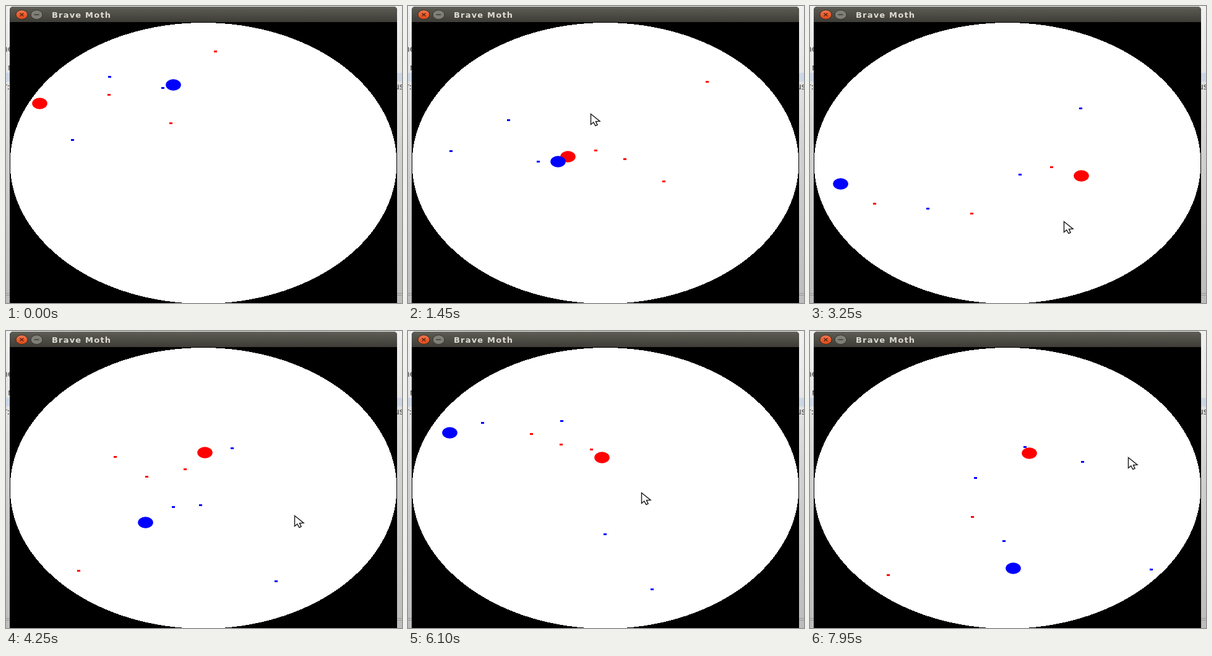
Write an HTML page that moves like this. It is 640 px wide and 480 px high and loops after 8 s.

```html
<!DOCTYPE html>
<html lang="en">
<head>
<meta charset="utf-8">
<title>Brave Moth</title>
<style>
  html, body { margin: 0; width: 100%; height: 100%; overflow: hidden; background: #ddd; }
  svg { display: block; width: 100vw; height: 100vh; }
  text { font-family: "DejaVu Sans", sans-serif; }
  .behind { font-size: 14px; fill: #444; }
  .crisp { shape-rendering: crispEdges; }
</style>
</head>
<body>
<svg viewBox="0 0 640 480">
  <defs>
    <linearGradient id="bar" x2="0" y2="1">
      <stop stop-color="#64635d"/><stop offset=".15" stop-color="#595850"/><stop offset="1" stop-color="#3d3c37"/>
    </linearGradient>
    <linearGradient id="desk" x2="0" y2="1">
      <stop stop-color="#f1f1f1"/><stop offset=".25" stop-color="#e2e2e2"/>
      <stop offset=".5" stop-color="#d0d0d0"/><stop offset="1" stop-color="#bcbcbc"/>
    </linearGradient>
    <linearGradient id="close" x2="0" y2="1">
      <stop stop-color="#f27850"/><stop offset="1" stop-color="#dd4814"/>
    </linearGradient>
  </defs>
  <rect width="640" height="480" fill="url(#desk)"/>
  <path d="M0 108H640V122H0z" fill="#cbd6e4"/>
  <path d="M0 464.500H640M0 467.500H640" stroke="#999"/>
  <g class="behind">
    <text x="-6" y="74">ne</text><text x="3" y="104">r</text>
    <text x="-4" y="135">r:</text><text x="627" y="135">us</text>
  </g>
  <path d="M6 480V7Q6 1 12 1H626Q632 1 632 7V480z" fill="#000"/>
  <path d="M6 26V7Q6 1 12 1H626Q632 1 632 7V26z" fill="url(#bar)"/>
  <ellipse cx="25.500" cy="14" rx="9.500" ry="7.500" fill="url(#close)" stroke="#3a2a22"/>
  <path d="M22.500 11.500L28.500 16.500M28.500 11.500L22.500 16.500" stroke="#56220f" stroke-width="1.500"/>
  <ellipse cx="49.500" cy="14" rx="9.500" ry="7.500" fill="#807e76" stroke="#34332f"/>
  <path d="M45.500 14H53.500" stroke="#3c3b37" stroke-width="1.500"/>
  <text x="74" y="18.500" font-size="13" font-weight="bold" letter-spacing="1.200" fill="#dfdbd2">Brave Moth</text>
  <ellipse class="crisp" cx="319" cy="254" rx="312.500" ry="227" fill="#fff"/>
  <g id="shots" class="crisp"></g>
  <ellipse id="red" cx=".500" cy=".500" rx="12.300" ry="9.200" fill="#f00"/>
  <ellipse id="blue" cx=".500" cy=".500" rx="12.300" ry="9.200" fill="#00f"/>
  <path id="cursor" d="M.500.500V17.500L4.800 13.900L7.900 19.500L11.100 18.100L8.500 12.700L15 12.200z"
    fill="#fff" stroke="#222" stroke-width="1.500"/>
</svg>
<script>
const LOOP = 8000, STEP = 50, SHOT_SPEED = 0.4;

// Key positions, all passed at the same times; speed is in px per ms
const TIMES = [0, 750, 2150, 3250, 5250, 7000, 7950];
const actors = {
  red: { speed: 0.18, keys: [[54, 157], [154, 182], [343, 166], [438, 274], [394, 319], [215, 296], [354, 197]] },
  blue: { speed: 0.2, keys: [[270, 127], [354, 243], [236, 365], [49, 287], [227, 143], [130, 336], [328, 383]] },
  cursor: { speed: 0, keys: [[300, -22], [254, 146], [350, 195], [410, 348], [484, 234], [282, 292], [514, 204]] }
};

const $ = id => document.getElementById(id);

let seed = 11;
function random() {
  seed = (seed * 16807) % 2147483647;
  return seed / 2147483647;
}

function slope(keys, i, axis) {
  const a = Math.max(i - 1, 0), b = Math.min(i + 1, keys.length - 1);
  return (keys[b][axis] - keys[a][axis]) / (TIMES[b] - TIMES[a]);
}

// Smooth curve through the keys; a jet swerves sideways to use up its speed
function at({ speed, keys }, t) {
  if (t <= 0) return keys[0];
  if (t >= TIMES[TIMES.length - 1]) return keys[keys.length - 1];
  const i = TIMES.findIndex(k => k > t) - 1, a = keys[i], b = keys[i + 1];
  const span = TIMES[i + 1] - TIMES[i], u = (t - TIMES[i]) / span, v = 1 - u;
  const dx = b[0] - a[0], dy = b[1] - a[1], chord = Math.hypot(dx, dy);
  const spare = Math.sqrt(Math.max(0, (speed * span) ** 2 - chord ** 2));
  const swerve = 0.45 * spare * Math.sin(Math.PI * u) ** 2 / chord;
  return [-dy, dx].map((side, k) =>
    a[k] * v * v * (1 + 2 * u) + b[k] * u * u * (3 - 2 * u) + side * swerve +
    span * u * v * (slope(keys, i, k) * v - slope(keys, i + 1, k) * u));
}

const inside = ([x, y]) => ((x - 319) / 312) ** 2 + ((y - 254) / 227) ** 2 < 1;

const where = (shot, t) => [
  shot.x + Math.cos(shot.angle) * SHOT_SPEED * (t - shot.start),
  shot.y + Math.sin(shot.angle) * SHOT_SPEED * (t - shot.start)];

// Each jet keeps firing roughly at its rival; shots end at the arena's edge
const shots = [];
function arm(id, rival, color) {
  for (let t = -1000; t < LOOP; t += 200 + random() * 130) {
    const [x, y] = at(actors[id], t), [rx, ry] = at(actors[rival], t);
    const angle = Math.atan2(ry - y, rx - x) + random() * 0.8 - 0.4;
    const shot = { x, y, angle, start: t, end: t };
    while (inside(where(shot, shot.end))) shot.end += 10;
    shot.el = document.createElementNS("http://www.w3.org/2000/svg", "ellipse");
    const look = { cx: 0.5, cy: 0.5, rx: 2.6, ry: 1.8, fill: color };
    for (const name in look) shot.el.setAttribute(name, look[name]);
    $("shots").append(shot.el);
    shots.push(shot);
  }
}
arm("red", "blue", "#f00");
arm("blue", "red", "#00f");

const move = (el, [x, y]) => el.setAttribute("transform", `translate(${Math.round(x)} ${Math.round(y)})`);

function draw(t) {
  for (const id in actors) move($(id), at(actors[id], t));
  $("cursor").style.display = t < 250 ? "none" : "";
  for (const shot of shots) {
    const live = t >= shot.start && t < shot.end;
    shot.el.style.display = live ? "" : "none";
    if (live) move(shot.el, where(shot, t));
  }
}

const begin = performance.now();
function tick() {
  const t = (performance.now() - begin) % LOOP;
  draw(Math.floor(t / STEP) * STEP);
  requestAnimationFrame(tick);
}
tick();
</script>
</body>
</html>
```
